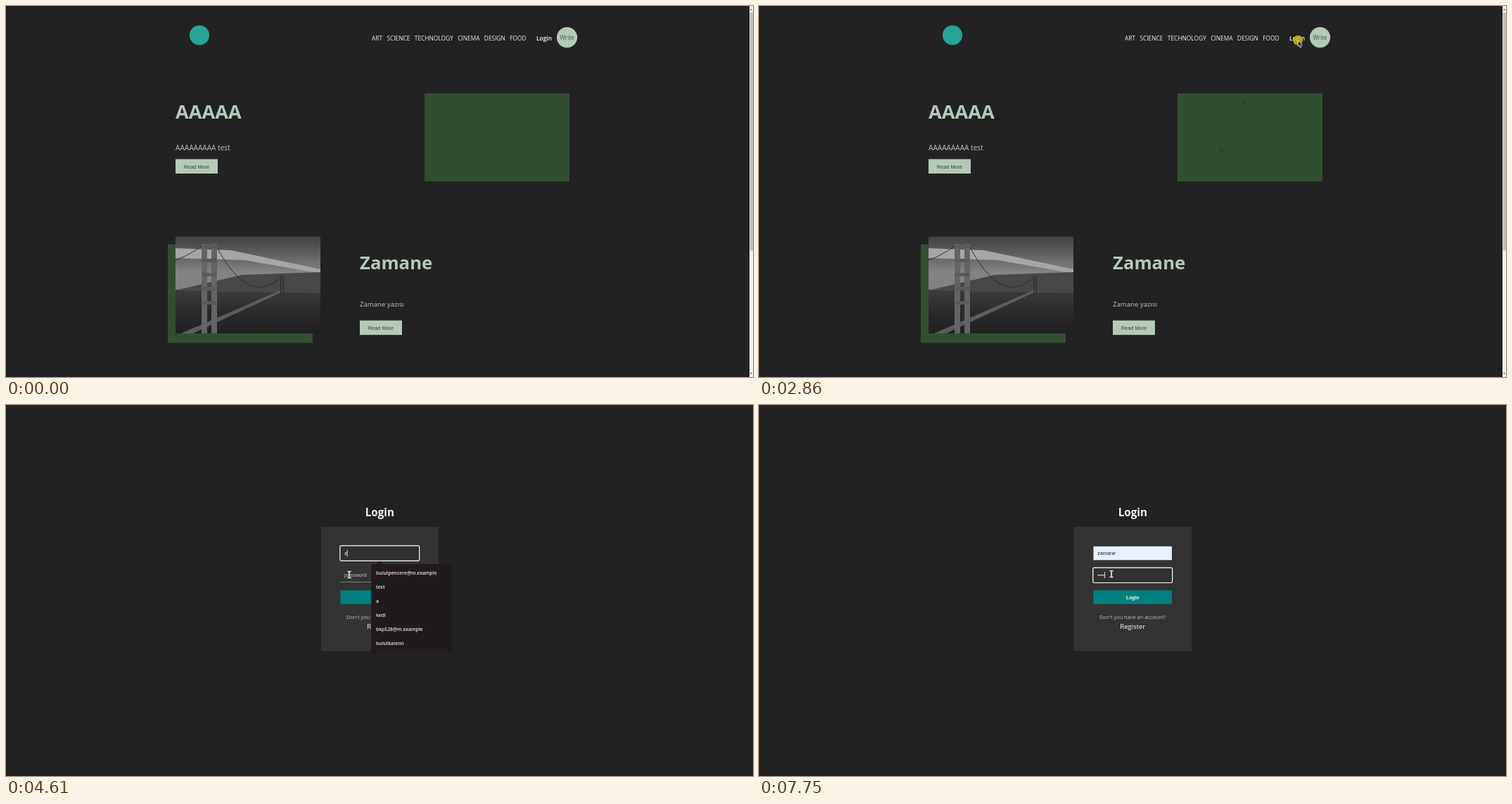
Animation, 1062 px wide and 527 px high, one loop 8 s. Source, as an HTML page with a canvas:

```html
<!DOCTYPE html>
<html lang="en">
<head>
<meta charset="utf-8">
<title>Blog login</title>
<style>
html, body { margin: 0; width: 100%; height: 100%; overflow: hidden; background: #222; }
canvas { display: block; width: 1062px; height: 527px; }
</style>
</head>
<body>
<canvas id="stage" width="1062" height="527"></canvas>
<script>
const ctx = document.getElementById('stage').getContext('2d');
const LOOP = 8000;
const LOGIN_AT = 2930, USER_FOCUS = 3350, TYPE_AT = 4550, MATCH_AT = 4680;
const HOVER_AT = 5050, PICK_AT = 5890, PASS_FOCUS = 6160, PASS_TYPE = 7250;
const KEY_GAP = 166, BLINK = 535;

const BG = '#222222', GREEN = '#304f32', PALE = '#b5c9b9', POPUP = '#211a1c', HINT = '#b9c2ae';
const SANS = '"Open Sans", "Noto Sans", sans-serif';
const ARIAL = '"Liberation Sans", Arial, sans-serif';
const INPUT = '7.37px ' + ARIAL;
const LEFT = 481, USER_Y = 210.5, PASS_Y = 241.7;

const USER = 'zamane';
const NAV = ['ART', 'SCIENCE', 'TECHNOLOGY', 'CINEMA', 'DESIGN', 'FOOD'];
const SAVED = ['bulutpencere@m.example', 'test', 'a', 'kedi', 'bkp528@m.example', 'bulutkalemi'];

// Pointer moves: start, end, then where it comes to rest
const ENTER = { x: 898, y: 168 };
const MOVES = [
  [120, 560, 88, 423], [560, 880, 272, 361], [880, 1080, 273, 302], [1080, 1630, 664, 217],
  [1765, 1900, 655, 198], [1900, 2190, 686, 131], [2190, 2520, 766, 48.5],
  [2860, 2930, 766, 53], [2930, 3250, 533, 212],
  [3880, 4080, 476, 234], [4080, 4220, 488, 241], [4760, 5210, 538, 229],
  [5345, 5680, 527, 239], [5890, 6040, 512, 306], [6040, 6180, 501, 240]
];
const CLICKS = [2790, 3280, 5690, 6160], CLICK_TIME = 190;
const TRAIL = [1900, 2190];

const clamp = v => Math.min(1, Math.max(0, v));
const within = (v, a, b) => v >= a && v < b;

function pointerAt(t) {
  let { x, y } = ENTER;
  for (const [from, to, nx, ny] of MOVES) {
    const k = clamp((t - from) / (to - from));
    x += (nx - x) * k;
    y += (ny - y) * k;
  }
  return [x, y];
}

function rect(x, y, w, h, color) {
  ctx.fillStyle = color;
  ctx.fillRect(x, y, w, h);
}

function round(x, y, w, h, r, color) {
  ctx.beginPath();
  ctx.roundRect(x, y, w, h, r);
  ctx.fillStyle = color;
  ctx.fill();
}

function disc(x, y, r, color) {
  ctx.beginPath();
  ctx.arc(x, y, r, 0, Math.PI * 2);
  ctx.fillStyle = color;
  ctx.fill();
}

function poly(color, ...pts) {
  ctx.beginPath();
  for (let i = 0; i < pts.length; i += 2) ctx.lineTo(pts[i], pts[i + 1]);
  ctx.closePath();
  ctx.fillStyle = color;
  ctx.fill();
}

function stroke(color, width) {
  ctx.strokeStyle = color;
  ctx.lineWidth = width;
  ctx.stroke();
}

function text(str, x, y, font, color, align = 'left') {
  ctx.font = font;
  ctx.textAlign = align;
  ctx.fillStyle = color;
  ctx.fillText(str, x, y);
  return ctx.measureText(str).width;
}

function vertical(y0, y1, ...colors) {
  const g = ctx.createLinearGradient(0, y0, 0, y1);
  colors.forEach((c, i) => g.addColorStop(i / (colors.length - 1), c));
  return g;
}

function clipped(x, y, w, h, paint) {
  ctx.save();
  ctx.beginPath();
  ctx.rect(x, y, w, h);
  ctx.clip();
  paint();
  ctx.restore();
}

function arrow(x, y, fill = '#1c1c1c', edge = '#e6e6e6') {
  ctx.save();
  ctx.translate(x, y);
  poly(fill, 0.4, 0.4, 0.4, 9, 2.3, 7.3, 3.6, 10.5, 5, 9.9, 3.7, 6.9, 6.4, 6.6);
  stroke(edge, 0.8);
  ctx.restore();
}

function beam(x, y) {
  for (const [grow, color] of [[0.6, '#a8a8a8'], [0, '#e4e4e4']]) {
    rect(x - 0.5 - grow, y - 4.5, 1 + 2 * grow, 9, color);
    for (const dy of [-5, 4]) rect(x - 2.5 - grow / 2, y + dy - grow / 2, 5 + grow, 1 + grow, color);
  }
}

function cable(x0, y0, sag, x1, y1) {
  ctx.beginPath();
  ctx.moveTo(x0, y0);
  ctx.quadraticCurveTo((x0 + x1) / 2, sag, x1, y1);
  stroke('#2a2a2a', 0.9);
}

function photo() {
  rect(241, 327, 206, 77, vertical(327, 404, '#404040', '#606060', '#848484', '#808080'));
  poly('#a6a6a6', 241, 344, 320, 347, 447, 374, 447, 380, 340, 361, 241, 358);
  rect(241, 403, 206, 63, vertical(403, 465, '#3c3c3c', '#2a2a2a', '#202020'));
  poly('#484848', 241, 404, 335, 382, 447, 378, 447, 408);
  cable(241, 361, 354, 281, 339);
  cable(298, 339, 430, 392, 384);
  poly('#5c5c5c', 249, 465, 266, 465, 393, 406, 392, 403);
  for (const x of [278, 292]) rect(x, 338, 8, 127, '#646464');
  for (let i = 0; i < 5; i++) rect(279, 339 + i * 20, 20, 5, '#5a5a5a');
  for (const x of [390, 393.5]) rect(x, 383, 1.5, 32, '#303030');
}

function button(x, y) {
  rect(x, y, 60, 20.5, PALE);
  text('Read More', x + 30, y + 13, INPUT, '#2c4a30', 'center');
}

function scrollbar() {
  rect(1057, 0, 5, 527, '#f1f1f1');
  rect(1057.5, 9.5, 4.5, 338, '#c1c1c1');
  for (const [y, d] of [[5, -1], [522, 1]]) poly('#505050', 1058, y - d, 1059.5, y + d, 1061, y - d);
}

function greenPanel(t) {
  rect(595, 124, 206, 125, GREEN);
  // faint marks the pointer leaves behind
  ctx.globalAlpha = 0.5;
  for (const at of TRAIL) if (t > at + 70) arrow(...pointerAt(at), '#343a35', '#343a35');
  ctx.globalAlpha = 1;
}

function home(t) {
  disc(275, 41.5, 14, '#25a497');
  let x = 520;
  for (const label of NAV) x += text(label, x, 48.5, '8.35px ' + SANS, '#eef2ee') + 6.4;
  text('Login', 754, 48.5, '600 8.4px ' + SANS, '#ffffff');
  disc(797.6, 44.6, 14.6, PALE);
  text('Write', 797.5, 48.3, '8.1px ' + SANS, '#3c5a44', 'center');

  text('AAAAA', 241, 159.5, 'bold 27.2px ' + SANS, PALE);
  text('AAAAAAAAA test', 241, 205, '10.1px ' + SANS, PALE);
  button(241, 217.5);
  greenPanel(t);

  rect(230, 338.5, 206, 140, GREEN);
  clipped(241, 327.5, 206, 137.5, photo);
  text('Zamane', 503, 374, 'bold 25.7px ' + SANS, PALE);
  text('Zamane yazısı', 503, 427, '9.6px ' + SANS, PALE);
  button(503, 446.7);
  scrollbar();
}

// The caret restarts its blink at every key press
function caret(x, y, age) {
  if (Math.floor(age / BLINK) % 2 === 0) rect(x, y - 4.5, 0.9, 9, '#f4f4f4');
}

function field(y, focused, filled) {
  if (filled) rect(475.5, y - 9.7, 111.5, 19.5, '#e8f0fe');
  else rect(475.5, y + 9.3, 111.5, 0.9, '#858585');
  if (!focused) return;
  round(474.8, y - 10.6, 112.9, 21.4, 1.8, filled ? 'transparent' : '#303030');
  stroke('#ffffff', 1.2);
}

function userField(t) {
  const focused = within(t, USER_FOCUS, PASS_FOCUS), filled = t >= HOVER_AT;
  field(USER_Y, focused, filled);
  const keys = t < TYPE_AT ? 0 : t < HOVER_AT ? 1 : USER.length;
  const color = filled ? '#22252c' : keys ? '#ffffff' : HINT;
  const width = text(keys ? USER.slice(0, keys) : 'username', LEFT, 213, INPUT, color);
  if (focused && !filled) caret(LEFT + (keys && width), USER_Y, t - (keys ? TYPE_AT : USER_FOCUS));
}

function passField(t) {
  const focused = t >= PASS_FOCUS;
  field(PASS_Y, focused, false);
  const keys = Math.min(4, Math.max(0, Math.floor((t - PASS_TYPE) / KEY_GAP) + 1));
  if (!keys) text('password', LEFT, 244.2, INPUT, HINT);
  for (let i = 0; i < keys; i++) disc(482.3 + i * 2.5, PASS_Y, 0.9, '#ffffff');
  const lastKey = keys ? PASS_TYPE + (keys - 1) * KEY_GAP : PASS_FOCUS;
  if (focused) caret(LEFT + keys * 2.55, PASS_Y, t - lastKey);
}

function cross(x, y, r, color) {
  ctx.beginPath();
  for (const d of [-r, r]) {
    ctx.moveTo(x - r, y - d);
    ctx.lineTo(x + r, y + d);
  }
  stroke(color, 0.9);
}

function popup(t) {
  if (!within(t, USER_FOCUS, PICK_AT)) return;
  const full = t < MATCH_AT, hover = t >= HOVER_AT, ink = '#eee4e6';
  const rows = full ? SAVED : [USER];
  poly(POPUP, 525.5, 226.5, 531, 221.5, 536.5, 226.5);
  round(519.3, 226, full ? 114 : 87, 5 + rows.length * 20.1, 3, POPUP);
  if (hover) round(521.3, 228.5, 83, 19.5, 1.5, '#3a3032');
  rows.forEach((s, i) => text(s, 526, 240.7 + i * 20.1, '600 6.8px ' + SANS, ink));
  if (hover) cross(594, 238.3, 2.2, ink);
}

function login(t) {
  const mid = 531.3;
  text('Login', mid, 158, 'bold 15.2px ' + SANS, '#f0f7ee', 'center');
  rect(447.7, 173, 167.3, 176.6, '#333333');
  userField(t);
  passField(t);
  rect(475.5, 263.3, 111.5, 19.5, '#008080');
  text('Login', mid, 275.5, 'bold 6.8px ' + ARIAL, '#ffffff', 'center');
  text("Don't you have an account?", mid, 303.5, '7.42px ' + SANS, PALE, 'center');
  text('Register', mid, 318, '9.5px ' + SANS, '#ffffff', 'center');
  popup(t);
}

function pointer(t) {
  if (t < MOVES[0][0]) return;
  const [x, y] = pointerAt(t);
  const clicking = CLICKS.some(at => within(t, at, Math.min(at + CLICK_TIME, at < LOGIN_AT ? LOGIN_AT : LOOP)));
  if (clicking) disc(x, y + 0.3, 7, 'rgba(196,182,18,0.86)');
  const onField = within(x, 475.5, 587) && [USER_Y, PASS_Y].some(fy => Math.abs(y - fy) < 10);
  const onPopup = within(t, USER_FOCUS, PICK_AT) && x > 519 && y > 226;
  if (t >= LOGIN_AT && onField && !onPopup) beam(x, y);
  else arrow(x, y);
}

function draw(t) {
  rect(0, 0, 1062, 527, BG);
  if (t < LOGIN_AT) home(t);
  else login(t);
  pointer(t);
}

const start = performance.now();
function tick() {
  draw((performance.now() - start) % LOOP);
  requestAnimationFrame(tick);
}
tick();
</script>
</body>
</html>
```
